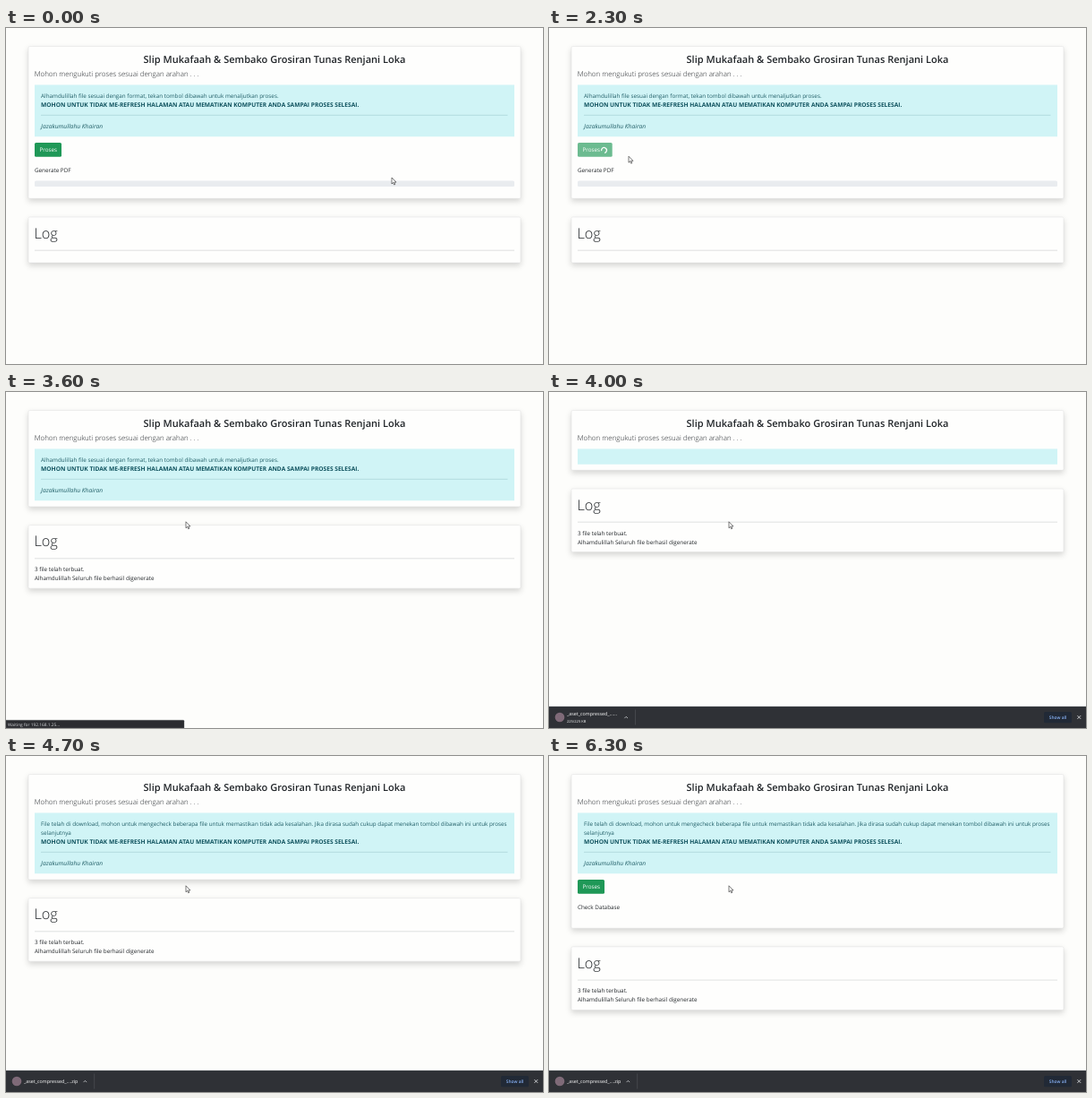
These frames come from a looping animation (600x375 px, 6.4 s). An HTML page:

```html
<!DOCTYPE html>
<html lang="id">
<head>
<meta charset="utf-8">
<style>
  html, body { margin: 0; width: 100%; height: 100%; overflow: hidden; background: #fdfdfb; }
  svg { display: block; }
  text { font: 6.31px "Open Sans", "Noto Sans", sans-serif; fill: #212529; text-rendering: geometricPrecision; white-space: pre; }
  .card { fill: #fefefd; stroke: #dededd; stroke-width: .45; filter: drop-shadow(0 3.3px 3.4px rgba(0, 0, 0, .16)); }
  .title { font-size: 11.05px; font-weight: 600; text-anchor: middle; }
  .lead { font-size: 7.95px; font-weight: 300; }
  .heading { font-size: 16.3px; font-weight: 300; }
  #alert text { fill: #1f5d66; }
  #alert .bold { font-size: 6.63px; font-weight: 700; fill: #0f525e; }
  #alert .thanks { font-size: 6.7px; font-style: italic; }
  #button text { fill: #fff; }
  #shelf text { font-size: 5.3px; fill: #fff; }
  #shelf .size { font-size: 4px; }
  #shelf .all { font-size: 4.9px; font-weight: 600; fill: #8ab4f8; }
  #status text { font-size: 4.8px; fill: #d5d7da; }
</style>
</head>
<body>
<svg width="600" height="375" viewBox="0 0 600 375">
  <defs>
    <pattern id="stripes" width="6.67" height="6.67" patternUnits="userSpaceOnUse">
      <path d="M0 0H3.33L6.67 3.33V6.67ZM0 3.33L3.33 6.67H0Z" fill="#fff" fill-opacity=".17"/>
    </pattern>
  </defs>

  <rect id="mainCard" class="card" x="25" y="20.5" width="550" rx="1.6"/>
  <text class="title" x="300" y="38.6">Slip Mukafaah &amp; Sembako Grosiran Tunas Renjani Loka</text>
  <text class="lead" x="31.7" y="53.6">Mohon mengukuti proses sesuai dengan arahan . . .</text>

  <svg id="alert" x="32" y="63.3" width="536" height="58">
    <rect width="536" height="100" fill="#d0f4f6"/>
    <g id="alertBody">
      <text id="before" x="7.1" y="14.6">Alhamdulillah file sesuai dengan format, tekan tombol dibawah untuk menaljutkan proses.</text>
      <g id="after">
        <text x="7.1" y="14.6">File telah di download, mohon untuk mengecheck beberapa file untuk memastikan tidak ada kesalahan. Jika dirasa sudah cukup dapat menekan tombol dibawah ini untuk proses</text>
        <text x="7.1" y="24.6">selanjutnya</text>
      </g>
      <g id="alertEnd">
        <text class="bold" x="7.1" y="24.6">MOHON UNTUK TIDAK ME-REFRESH HALAMAN ATAU MEMATIKAN KOMPUTER ANDA SAMPAI PROSES SELESAI.</text>
        <path d="M7 34H528.5" stroke="#a5d0d4" stroke-width=".7"/>
        <text class="thanks" x="7.1" y="48.4">Jazakumullahu Khairan</text>
      </g>
    </g>
  </svg>

  <svg id="form" x="28" width="544">
    <g transform="translate(4)">
      <g id="button">
        <rect id="buttonBox" y="6.7" height="15.8" rx="1.6" fill="#1f9857"/>
        <text x="5.4" y="16.9">Proses</text>
        <circle id="spinner" cx="29.5" cy="15.2" r="2.9" fill="none" stroke="#fff" stroke-width="1.2" pathLength="8" stroke-dasharray="6 2" stroke-dashoffset="-1"/>
      </g>
      <text id="label" y="40.1"></text>
      <rect y="49.1" width="536" height="6.7" rx="1.6" fill="#e9ecef"/>
      <rect class="bar" y="49.1" height="6.7" rx="1.2" fill="#14d3ec"/>
      <rect class="bar" y="49.1" height="6.7" rx="1.2" fill="url(#stripes)"/>
    </g>
  </svg>

  <g id="log">
    <rect id="logCard" class="card" x="25" width="550" rx="1.6"/>
    <text class="heading" x="31.4" y="23.9">Log</text>
    <path d="M32 37.2H568" stroke="#d2d3d3" stroke-width=".7"/>
    <text id="count" x="32" y="51.6"></text>
    <text id="done" x="32" y="61.6">Alhamdulillah Seluruh file berhasil digenerate</text>
  </g>

  <g id="status">
    <path d="M0 366.3H198Q199 366.3 199 367.3V375H0Z" fill="#2b2c30" stroke="#55585d" stroke-width=".4"/>
    <text x="2" y="372.6">Waiting for 192.168.1.25...</text>
  </g>

  <g id="shelf">
    <rect y="351" width="600" height="24" fill="#2f3136"/>
    <path d="M0 351.2H600" stroke="#55585d" stroke-width=".4"/>
    <circle cx="12" cy="363" r="5.3" fill="#7f6a78"/>
    <text id="file" x="20"></text>
    <text id="size" class="size" x="20" y="369.3">225/225 KB</text>
    <g id="shelfEnd" fill="none">
      <path d="M84.4 364.1L86.2 362.3 88 364.1" stroke="#d5d7da" stroke-width=".8"/>
      <path d="M96.5 354.5V371.5" stroke="#55585d" stroke-width=".6"/>
    </g>
    <rect x="553" y="357" width="31" height="12.3" rx="1.6" fill="#212936"/>
    <text class="all" x="558.8" y="364.8">Show all</text>
    <path d="M590.4 361.1L594.2 364.9M594.2 361.1L590.4 364.9" stroke="#e8eaed" stroke-width=".8"/>
  </g>

  <path id="cursor" d="M0 0V7L1.6 5.5 2.7 8 3.8 7.5 2.7 5.1H5Z" fill="#fff" stroke="#222" stroke-width=".6"/>
</svg>
<script>
  const LOOP = 6400, STEP = 100;
  const CLICK = 500, FIRST = 2935, FINISH = 3200, SHELF = 3800, SWAP = 3865, SETTLED = 4300, NEXT = 5994;
  const FORM = 62.4, BAR = 536;
  // time, x, y of the pointer tip
  const pointer = [
    [0, 431, 167], [500, 51, 139], [1000, 53, 141.5], [2100, 53, 141.5],
    [2700, 197, 148.3], [3200, 197, 148.3], [3500, 201, 144.8], [LOOP, 201, 144.8]
  ];

  const $ = id => document.getElementById(id);
  const set = (id, name, value) => $(id).setAttribute(name, value);
  const show = (id, on) => { $(id).style.display = on ? '' : 'none'; };
  const move = (id, x, y) => set(id, 'transform', `translate(${x} ${y})`);
  const part = (t, start, length) => Math.min(1, Math.max(0, (t - start) / length));
  const swing = p => .5 - Math.cos(p * Math.PI) / 2;
  const easeOut = p => 1 - (1 - p) ** 2;

  function pointerAt(t) {
    const i = pointer.findIndex(key => key[0] > t);
    const [t0, x0, y0] = pointer[i - 1], [t1, x1, y1] = pointer[i];
    const p = swing(part(t, t0, t1 - t0));
    return [x0 + (x1 - x0) * p, y0 + (y1 - y0) * p];
  }

  function barWidth(t) {
    const first = BAR / 3 * easeOut(part(Math.min(t, FINISH), FIRST, 600));
    return first + (BAR - first) * easeOut(part(t, FINISH, 600));
  }

  function drawAlert(t) {
    const swapped = t >= SWAP;
    const height = swapped ? 68 * swing(part(t, SWAP, 400)) : 58;
    set('alert', 'height', height);
    show('before', !swapped);
    show('after', swapped);
    move('alertEnd', 0, swapped ? 10 : 0);
    move('alertBody', 0, swapped && t < SETTLED ? 8.3 : 0);
    return 63.3 + height;
  }

  function drawForm(t, top) {
    const again = t >= NEXT;
    const open = again ? swing(part(t, NEXT, 400)) : 1 - swing(part(t, FINISH, 400));
    const busy = t > CLICK && !again;
    const pressed = t === CLICK;
    set('form', 'y', top);
    set('form', 'height', Math.max(0, FORM * open - 6.6));
    set('buttonBox', 'width', busy ? 38.7 : 30);
    set('buttonBox', 'stroke', pressed ? '#c3e3d2' : 'none');
    set('button', 'opacity', busy ? .65 : 1);
    show('spinner', busy);
    set('spinner', 'transform', `rotate(${(t - 544) / 750 * 360} 29.5 15.2)`);
    $('label').textContent = again ? 'Check Database' : 'Generate PDF';
    const width = again ? 0 : barWidth(t);
    document.querySelectorAll('.bar').forEach(bar => bar.setAttribute('width', width));
    set('stripes', 'patternTransform', `translate(${-t / 1000 * 6.67} 49.1)`);
    return FORM * open;
  }

  function drawLog(t, top) {
    const lines = t < 2900 ? 0 : t < FINISH ? 1 : 2;
    move('log', 0, top);
    set('logCard', 'height', 51 + 10 * lines - (lines ? .4 : 0));
    $('count').textContent = ['', '1 file telah terbuat.', '3 file telah terbuat.'][lines];
    show('done', lines === 2);
  }

  function drawShelf(t) {
    const loading = t < 4500;
    show('status', t >= 3400 && t < SHELF);
    show('shelf', t >= SHELF);
    $('file').textContent = loading ? '_aset_compressed_......' : '_aset_compressed_....zip';
    set('file', 'y', loading ? 360.9 : 365);
    show('size', loading);
    move('shelfEnd', loading ? 0 : 2.2, 0);
  }

  function draw(now) {
    const t = Math.floor(now % LOOP / STEP) * STEP;
    const alertBottom = drawAlert(t);
    const cardBottom = alertBottom + 6.6 + drawForm(t, alertBottom);
    set('mainCard', 'height', cardBottom - 20.5);
    drawLog(t, cardBottom + 20.7);
    drawShelf(t);
    move('cursor', ...pointerAt(t));
  }

  function tick() {
    draw(performance.now());
    requestAnimationFrame(tick);
  }
  tick();
</script>
</body>
</html>
```
